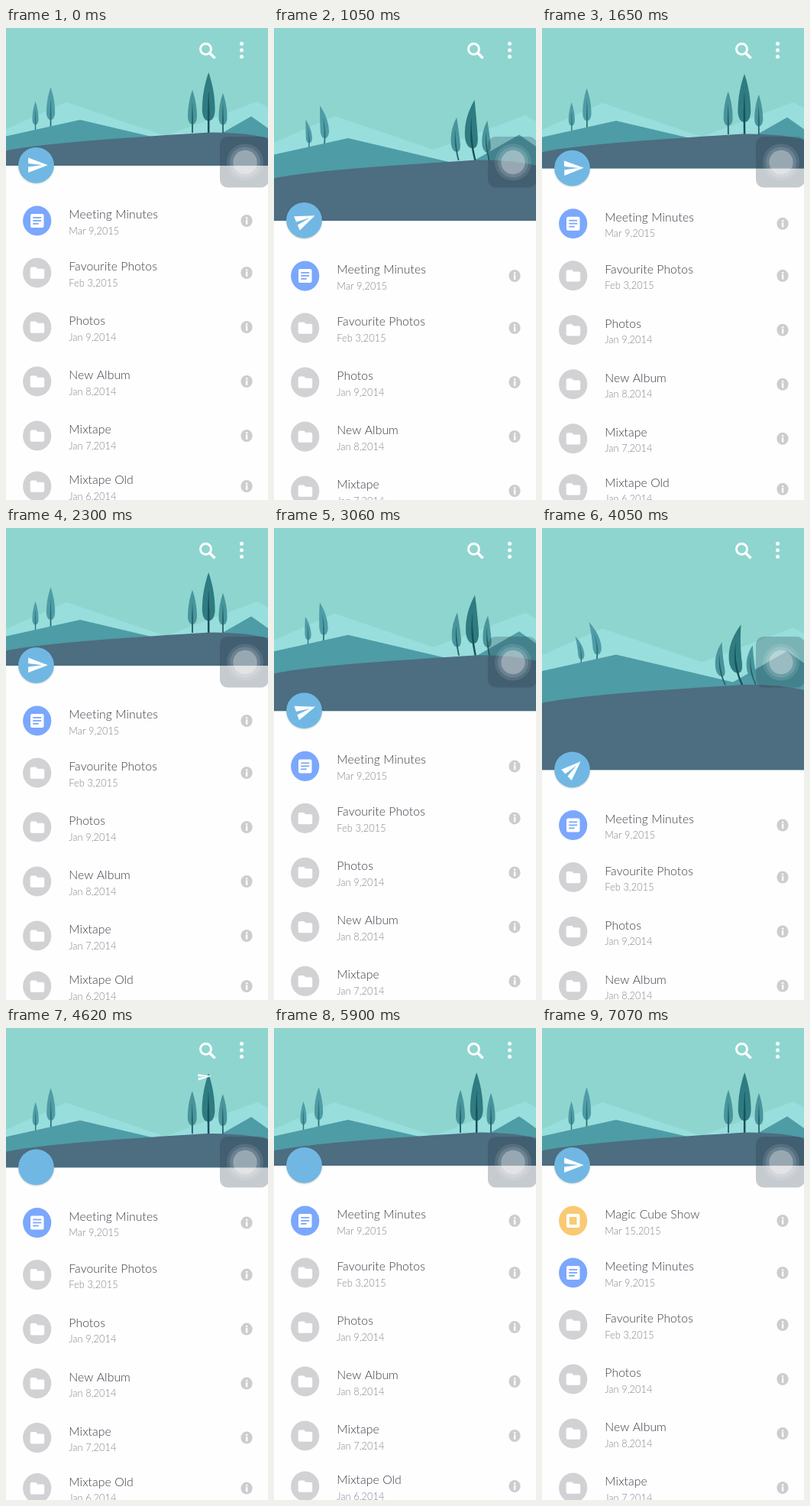
Write an HTML page with a canvas that moves like this. It is 343 by 617 pixels and loops after 7490 ms.

```html
<!DOCTYPE html>
<html lang="en">
<head>
<meta charset="utf-8">
<title>Pull to refresh</title>
<style>
html, body { margin: 0; width: 100%; height: 100%; overflow: hidden; background: #fefefe; }
canvas { display: block; width: 343px; height: 617px; }
</style>
</head>
<body>
<canvas id="stage"></canvas>
<script>
const W = 343, H = 617, LOOP = 7490, REST = 180, ROW = 252, FAB_X = 39.5;
const canvas = document.getElementById('stage');
const ctx = canvas.getContext('2d');
const dpr = window.devicePixelRatio || 1;
canvas.width = W * dpr;
canvas.height = H * dpr;

const SKY = '#8ed5cf', FAR = '#97dedd', MID = '#4e9ca6', HILL = '#4d6d80';
const GREY = '#d2d2d5', BLUE = '#7ba7fd', ORANGE = '#f9ca73';

const items = [
  ['Meeting Minutes', 'Mar 9,2015', 0, 'doc'],
  ['Favourite Photos', 'Feb 3,2015', 68, 'folder'],
  ['Photos', 'Jan 9,2014', 139, 'folder'],
  ['New Album', 'Jan 8,2014', 210, 'folder'],
  ['Mixtape', 'Jan 7,2014', 281, 'folder'],
  ['Mixtape Old', 'Jan 6,2014', 347, 'folder']
];
const newItem = ['Magic Cube Show', 'Mar 15,2015', 0, 'frame'];

const clamp = v => Math.max(0, Math.min(1, v));
const phase = (t, start, length) => clamp((t - start) / length);
const mix = (a, b, u) => a + (b - a) * u;
const easeOut = u => 1 - (1 - u) * (1 - u);
const easeInOut = u => (1 - Math.cos(Math.PI * u)) / 2;
const overshoot = u => { const v = u - 1; return 1 + v * v * (4 * v + 3); };
const tilt = deg => Math.cos(deg * Math.PI / 180);

// Quadratic Bezier easing with the control point (a, 1)
function quadEase(a, u) {
  const k = 1 - 2 * a;
  const s = (-a + Math.sqrt(a * a + k * u)) / k;
  return 2 * s - s * s;
}

// Each pull drags the header down, then lets it spring back
const pulls = [
  { start: 410, drag: 831, release: 1241, dist: 76 },
  { start: 2830, drag: 930, release: 4110, dist: 136.5 }
];

function pullAt(t) {
  for (const p of pulls) {
    if (t < p.start || t >= p.release + 1050) continue;
    if (t < p.release) return p.dist * easeOut(phase(t, p.start, p.drag));
    const u = (t - p.release) / 1000;
    return p.dist * Math.pow(2, -10 * u) * Math.cos(u * Math.PI * 2 / 0.45) * clamp((1.05 - u) * 5);
  }
  return 0;
}

function polygon(color, points, dy) {
  ctx.fillStyle = color;
  ctx.beginPath();
  ctx.moveTo(0, H);
  for (const [x, y] of points) ctx.lineTo(x, y + dy);
  ctx.lineTo(W, H);
  ctx.fill();
}

function disc(x, y, r, color, ry = r) {
  ctx.fillStyle = color;
  ctx.beginPath();
  ctx.ellipse(x, y, r, ry, 0, 0, Math.PI * 2);
  ctx.fill();
}

function box(x, y, w, h, r, color) {
  ctx.fillStyle = color;
  ctx.beginPath();
  ctx.roundRect(x, y, w, h, r);
  ctx.fill();
}

// bend = [linear, quadratic] sideways offset of the stem, relative to its height
function tree(x, y, h, bend, leaf, trunk) {
  const N = 28, wide = 0.38;
  const stem = p => x + h * (bend[0] * p + bend[1] * p * p);
  const half = p => {
    if (p < wide) return 0.106 * h * Math.sqrt(Math.max(0, 1 - ((wide - p) / 0.19) ** 2));
    return 0.106 * h * (1 - ((p - wide) / (1 - wide)) ** 2);
  };
  const outline = (from, to, width) => {
    ctx.beginPath();
    for (let i = 0; i <= 2 * N; i++) {
      const side = i <= N ? -1 : 1;
      const p = mix(from, to, (i <= N ? i : 2 * N - i) / N);
      ctx.lineTo(stem(p) + side * width(p), y - p * h);
    }
    ctx.closePath();
    ctx.fill();
  };
  ctx.fillStyle = leaf;
  outline(0.19, 1, half);
  ctx.fillStyle = trunk;
  outline(0, 0.7, p => 0.014 * h * Math.min(1, (0.7 - p) / 0.35) + 0.15);
}

function scene(d) {
  const f = Math.max(-1, Math.min(1, d / 125));
  const far = d / 4, mid = d / 3, near = d / 2;
  ctx.fillStyle = SKY;
  ctx.fillRect(0, 0, W, REST + d);
  ctx.save();
  ctx.beginPath();
  ctx.rect(0, 0, W, REST + d);
  ctx.clip();
  polygon(FAR, [[0, 132], [79, 97], [209, 141], [329, 96], [W, 104]], far);
  const left = [0.2 * f, -0.38 * f];
  tree(38.5 + 12 * f, 134 + mid, 38, left, MID, '#2f7079');
  tree(58.5 + 12.5 * f, 130.5 + mid, 53, left, MID, '#2f7079');
  polygon(MID, [[0, 141.5], [97, 120], [250, 156], [321, 115.5], [W, 131]], mid);
  const small = [-0.46 * f, 0.38 * f], tall = [-0.46 * f, 0.44 * f];
  tree(244 - 4 * f, 137 + near, 56, small, '#48959b', '#266069');
  tree(284 - 4 * f, 137 + near, 52, small, '#48959b', '#266069');
  tree(265.2 - 3 * f, 137 + near, 79, tall, '#2e7c81', '#1b505a');
  ctx.fillStyle = HILL;
  ctx.beginPath();
  ctx.moveTo(0, 160.5 + near);
  ctx.quadraticCurveTo(43, 150 + near, 262, 136.7 + near);
  ctx.quadraticCurveTo(305, 135.7 + near, W, 143.5 + near);
  ctx.lineTo(W, H);
  ctx.lineTo(0, H);
  ctx.fill();
  ctx.restore();
}

function toolbar() {
  ctx.strokeStyle = '#fff';
  ctx.lineWidth = 3;
  ctx.beginPath();
  ctx.arc(261.5, 27.5, 7, 0, Math.PI * 2);
  ctx.stroke();
  ctx.lineWidth = 3.6;
  ctx.beginPath();
  ctx.moveTo(266.5, 32.5);
  ctx.lineTo(273.5, 39.5);
  ctx.stroke();
  for (const y of [20.5, 29, 37.5]) disc(308.5, y, 2.5, '#fff');
}

const glyphs = {
  doc() {
    box(-8.7, -9, 17.5, 18, 2.2, '#fff');
    ctx.fillStyle = BLUE;
    for (const [y, w] of [[-5, 11], [-1, 11], [3, 7.5]]) ctx.fillRect(-5.5, y, w, 1.8);
  },
  folder() {
    box(-9, -7.5, 9, 6, 2, '#fff');
    box(-9, -5.2, 18.5, 13, 2, '#fff');
  },
  frame() {
    box(-8.7, -9, 17.5, 18, 2.2, '#fff');
    ctx.fillStyle = ORANGE;
    ctx.fillRect(-4.8, -5, 9.6, 10);
  }
};
const tints = { doc: BLUE, folder: GREY, frame: ORANGE };

function label(text, y, font, color) {
  ctx.font = font;
  ctx.fillStyle = color;
  ctx.fillText(text, 82.3, y);
}

function row([title, date, , kind], y, alpha = 1, swing = 1) {
  if (y > H + 30 || alpha <= 0) return;
  ctx.save();
  ctx.globalAlpha = alpha;
  ctx.translate(0, y);
  ctx.save();
  ctx.translate(40.7, 0);
  ctx.scale(1, swing);
  disc(0, 0, 18.6, tints[kind], 19.6);
  glyphs[kind]();
  ctx.restore();
  // Any letter spacing turns ligatures off
  ctx.letterSpacing = '0.05px';
  label(title, -3, '300 15.8px Lato, sans-serif', '#3a3d46');
  label(date, 17.5, '300 12.8px Lato, sans-serif', '#83858f');
  disc(315, 0, 7.6, '#cdcdcf', 8);
  ctx.fillStyle = '#fff';
  ctx.fillRect(313.9, -4.8, 2.4, 2.2);
  ctx.fillRect(313.9, -1.6, 2.4, 6.4);
  ctx.restore();
}

function list(t, d) {
  ctx.fillStyle = '#fefefe';
  ctx.fillRect(0, REST + d, W, H);
  const shift = 68 * easeInOut(phase(t, 6500, 250));
  for (const item of items) row(item, ROW + d + item[2] + shift);
  const u = phase(t, 6650, 400);
  row(newItem, ROW + d, clamp(u * 3), mix(0.7, 1, overshoot(u)));
}

function plane(x, y, angle, sx, sy) {
  ctx.save();
  ctx.translate(x, y);
  ctx.rotate(angle * Math.PI / 180);
  ctx.scale(sx * 1.22, sy * 1.09);
  ctx.fillStyle = '#fff';
  ctx.beginPath();
  for (const [px, py] of [[-8.5, 9], [12.5, 0], [-8.5, -9], [-8.5, -2], [6.5, 0], [-8.5, 2]]) ctx.lineTo(px, py);
  ctx.fill();
  ctx.restore();
}

function flight(t, y) {
  if (t < 4110) return plane(FAB_X, y, -0.32 * Math.max(0, pullAt(t)), 1, 1);
  if (t < 4960) {
    const u = phase(t, 4110, 800), e = easeOut(u), s = mix(1, 0.5, u);
    if (u < 1) plane(FAB_X + W * u, y - 150 * quadEase(0.7, u), mix(-44, 0, e), s, s * tilt(60 * e));
  } else if (t < 5500) {
    const u = phase(t, 5100, 400), s = mix(0.5, 0.9, u);
    if (u > 0 && u < 1) plane(mix(382, -24, u), mix(30, 169, quadEase(0.1, u)), 0, -s, s * tilt(mix(60, 30, u)));
  } else if (t >= 6120) {
    const u = phase(t, 6100, 400), s = mix(0.9, 1, u);
    plane(mix(-24, FAB_X, u), mix(y - 9, y, u), 0, s, s * tilt(mix(30, 0, u)));
  }
}

function fab(y) {
  ctx.save();
  ctx.shadowColor = 'rgba(0,0,0,.2)';
  ctx.shadowBlur = 2 * dpr;
  ctx.shadowOffsetY = dpr;
  disc(FAB_X, y, 23.4, '#70b8e3');
  ctx.restore();
}

function touchButton() {
  box(280, 142, 64, 66.4, 10, 'rgba(35,55,70,.26)');
  disc(313, 175.5, 24, 'rgba(255,255,255,.1)');
  disc(313, 175.5, 20, 'rgba(255,255,255,.13)');
  disc(313, 175.5, 15.7, 'rgba(255,255,255,.3)');
}

function draw(now) {
  const t = now % LOOP;
  const d = pullAt(t);
  const fabY = REST - 0.7 + d;
  ctx.setTransform(dpr, 0, 0, dpr, 0, 0);
  ctx.clearRect(0, 0, W, H);
  scene(d);
  list(t, d);
  fab(fabY);
  flight(t, fabY);
  toolbar();
  touchButton();
}

const begin = performance.now();
function tick() {
  draw(performance.now() - begin);
  requestAnimationFrame(tick);
}
tick();
</script>
</body>
</html>
```
